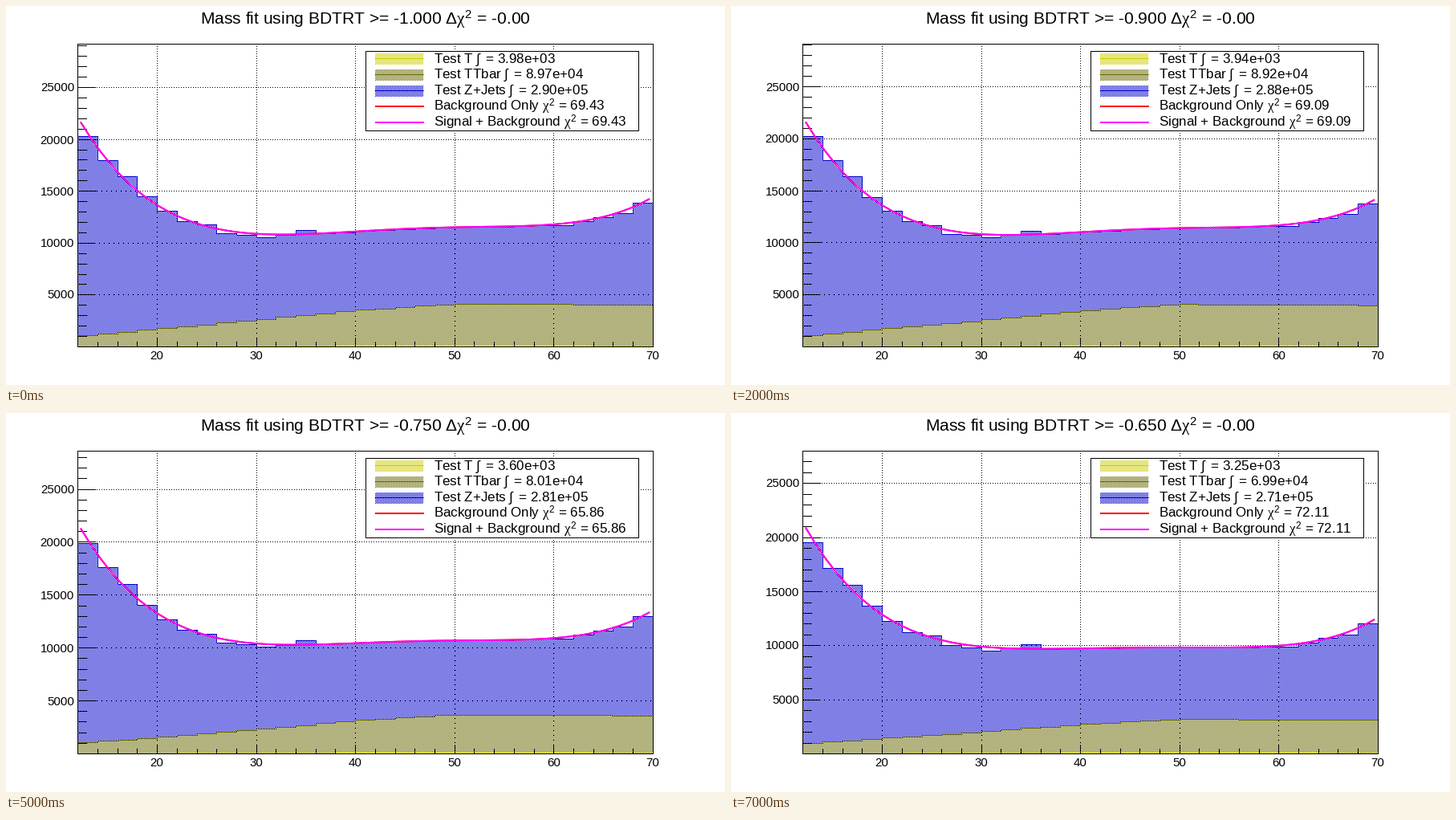
Write a matplotlib script that moves like this. It is 896 px wide and 472 px high and loops after 8000 ms.

```python
import numpy as np
import matplotlib.pyplot as plt
from matplotlib.animation import FuncAnimation

W, H, DPI = 896, 472, 100
LEFT, RIGHT, TOP, BOTTOM = 89, 806, 47, 424
BLACK, WHITE = (0, 0, 0), (255, 255, 255)
BLUE, OLIVE, YELLOW = (0, 0, 204), (102, 102, 0), (204, 204, 0)
RED, MAGENTA = "#ff0000", "#ff00ff"
STEPS = 8
BUMP_STEP = 1

plt.rcParams.update({
    "font.family": ["Liberation Sans", "DejaVu Sans"],
    "mathtext.fontset": "custom",
    "mathtext.rm": "Liberation Sans",
    "mathtext.it": "Liberation Serif",
})

# Readouts at a few cuts; the cuts between are interpolated.
KEYS = [0, 1, 3, 5, 6, 7]
N_T = [3980, 3970, 3920, 3600, 3430, 3250]
N_TT = [89700, 89600, 88800, 80100, 75000, 69900]
N_Z = [290000, 289000, 287000, 281000, 276000, 271000]
CHI2 = [69.43, 68.41, 69.78, 65.86, 71.48, 72.11]

EDGES = np.arange(12, 71, 2)
MIDS = EDGES[:-1] + 1
CURVE_X = np.linspace(12.3, 69.7, 60)

# Smooth shape through a few points, and the bins that stray from it.
FIT_X = np.array([12.3, 16, 20, 24, 28, 34, 44, 56, 62, 66, 69.7])
FIT_Y = [21655, 16780, 13690, 11910, 10980, 10790, 11330, 11540, 12010,
         12720, 14230]
STRAY = {13: -290, 17: 500, 19: 150, 23: -130, 25: 165, 27: -290,
         29: -150, 31: -270, 35: 385, 61: -140, 67: -220}

yy, xx = np.mgrid[:H, :W]
CHECKER = (xx + yy) % 2 == 0


def unit(x):
    return (np.asarray(x) - 41) / 29


POLY = np.polyfit(unit(FIT_X), FIT_Y, 6)


def fit_curve(x, w):
    """Background shape; w goes from the loosest to the tightest cut."""
    drop = 1280 + 560 * np.tanh((x - 38) / 13)
    return np.polyval(POLY, unit(x)) - w * drop


def signal(x):
    return (560 * np.exp(-((x - 28.8) / 2.3) ** 2)
            - 480 * np.exp(-(x - 12.3) / 3.5)
            - 200 * np.clip((x - 52) / 16, 0, 1))


def total_bins(w):
    return fit_curve(MIDS, w) + [STRAY.get(int(m), 0) for m in MIDS]


def ttbar_bins(w):
    shape = np.interp(MIDS, [12, 30, 40, 50, 70], [1000, 2550, 3480, 4120, 4030])
    return shape * (1 - w * (0.23 - 0.15 * np.exp(-(MIDS - 12) / 8)))


def single_bins(w):
    return 160 * np.exp(-((MIDS - 51) / 24) ** 2) * (1 - 0.06 * w)


def col(x):
    return 89.3 + (np.asarray(x) - 12) * 12.353


def row(v, ymax):
    return BOTTOM - np.asarray(v) * (BOTTOM - TOP) / ymax


def px(v):
    return np.rint(v).astype(int)


def stipple(img, x0, x1, y0, y1, color):
    img[y0:y1, x0:x1][CHECKER[y0:y1, x0:x1]] = color


def draw_hist(img, tops, color):
    cols = px(col(EDGES))
    previous = tops[0]
    for x0, x1, y in zip(cols, cols[1:], tops):
        stipple(img, x0, x1, y, BOTTOM, color)
        img[y, x0:x1 + 1] = color
        img[min(previous, y):max(previous, y) + 1, x0] = color
        previous = y


def draw_box(img, x0, y0, x1, y1):
    img[[y0, y1], x0:x1 + 1] = BLACK
    img[y0:y1 + 1, [x0, x1]] = BLACK


def draw_legend(img):
    img[56:156, 448:789] = WHITE
    draw_box(img, 448, 56, 788, 155)
    for y, color in zip((59, 79, 99), (YELLOW, OLIVE, BLUE)):
        stipple(img, 460, 520, y, y + 14, color)
        img[y + 6, 460:521] = color


def paint(ymax, w):
    img = np.full((H, W, 3), 255, np.uint8)
    img[px(row(np.arange(5000, 25001, 5000), ymax)), LEFT:RIGHT:3] = BLACK
    img[TOP:BOTTOM:3, px(col(np.arange(20, 61, 10)))] = BLACK

    for bins, color in ((total_bins, BLUE), (ttbar_bins, OLIVE),
                        (single_bins, YELLOW)):
        draw_hist(img, px(row(bins(w), ymax)), color)

    for v in range(1000, int(ymax), 1000):
        size = 12 if v % 5000 else 23
        img[px(row(v, ymax)), LEFT:LEFT + size] = BLACK
    for x in EDGES:
        size = 6 if x % 10 else 11
        img[BOTTOM - size:BOTTOM, px(col(x))] = BLACK
    draw_box(img, LEFT, TOP, RIGHT, BOTTOM)
    draw_legend(img)
    return img


fig = plt.figure(figsize=(W / DPI, H / DPI), dpi=DPI, facecolor="white")
ax = fig.add_axes([0, 0, 1, 1])
ax.axis("off")
picture = ax.imshow(np.full((H, W, 3), 255, np.uint8), extent=(0, W, H, 0),
                    interpolation="nearest", aspect="auto")
ax.set_xlim(0, W)
ax.set_ylim(H, 0)


def label(x, y, size, align, text=""):
    return ax.text(x, y, text, fontsize=size * 72 / DPI, ha=align,
                   va="baseline", color="black")


def stroke(color, x=(), y=()):
    return ax.plot(x, y, color=color, lw=2 * 72 / DPI,
                   solid_capstyle="butt")[0]


background = stroke(RED)
combined = stroke(MAGENTA)
stroke(RED, [460, 521], [125, 125])
stroke(MAGENTA, [460, 521], [145, 145])

title = label(448, 23, 21, "center")
entries = [label(533, y, 17, "left") for y in (71, 90.5, 110, 130, 150)]
y_labels = [label(85, 0, 15, "right", str(v)) for v in range(5000, 25001, 5000)]
for tick in range(20, 71, 10):
    label(float(col(tick)), 440, 15, "center", str(tick))


def update(i):
    counts = [np.interp(i, KEYS, n) for n in (N_T, N_TT, N_Z)]
    loose, tight = (N_T[k] + N_TT[k] + N_Z[k] for k in (0, -1))
    w = (loose - sum(counts)) / (loose - tight)
    ymax = 29180 - 1180 * w
    picture.set_data(paint(ymax, w))

    delta = 129.74 if i == BUMP_STEP else 0
    chi2 = np.interp(i, KEYS, CHI2)
    fit = fit_curve(CURVE_X, w)
    both = fit + signal(CURVE_X) if delta else fit
    background.set_data(col(CURVE_X), row(fit, ymax))
    combined.set_data(col(CURVE_X), row(both, ymax))

    title.set_text(f"Mass fit using BDTRT >= {-1 + 0.05 * i:.3f} "
                   rf"$\Delta\chi^2$ = -{delta:.2f}")
    names = ("T", "TTbar", "Z+Jets")
    texts = [rf"Test {name} ∫$\,$ = {n:.2e}" for name, n in zip(names, counts)]
    texts += [rf"Background Only $\chi^2$ = {chi2:.2f}",
              rf"Signal + Background $\chi^2$ = {chi2 + delta:.2f}"]
    for entry, text in zip(entries, texts):
        entry.set_text(text)
    for k, text in enumerate(y_labels, 1):
        text.set_y(px(row(5000 * k, ymax)) + 5.5)
    return []


anim = FuncAnimation(fig, update, frames=STEPS, init_func=lambda: [],
                     interval=1000, repeat=True, repeat_delay=0)
plt.show()
```
